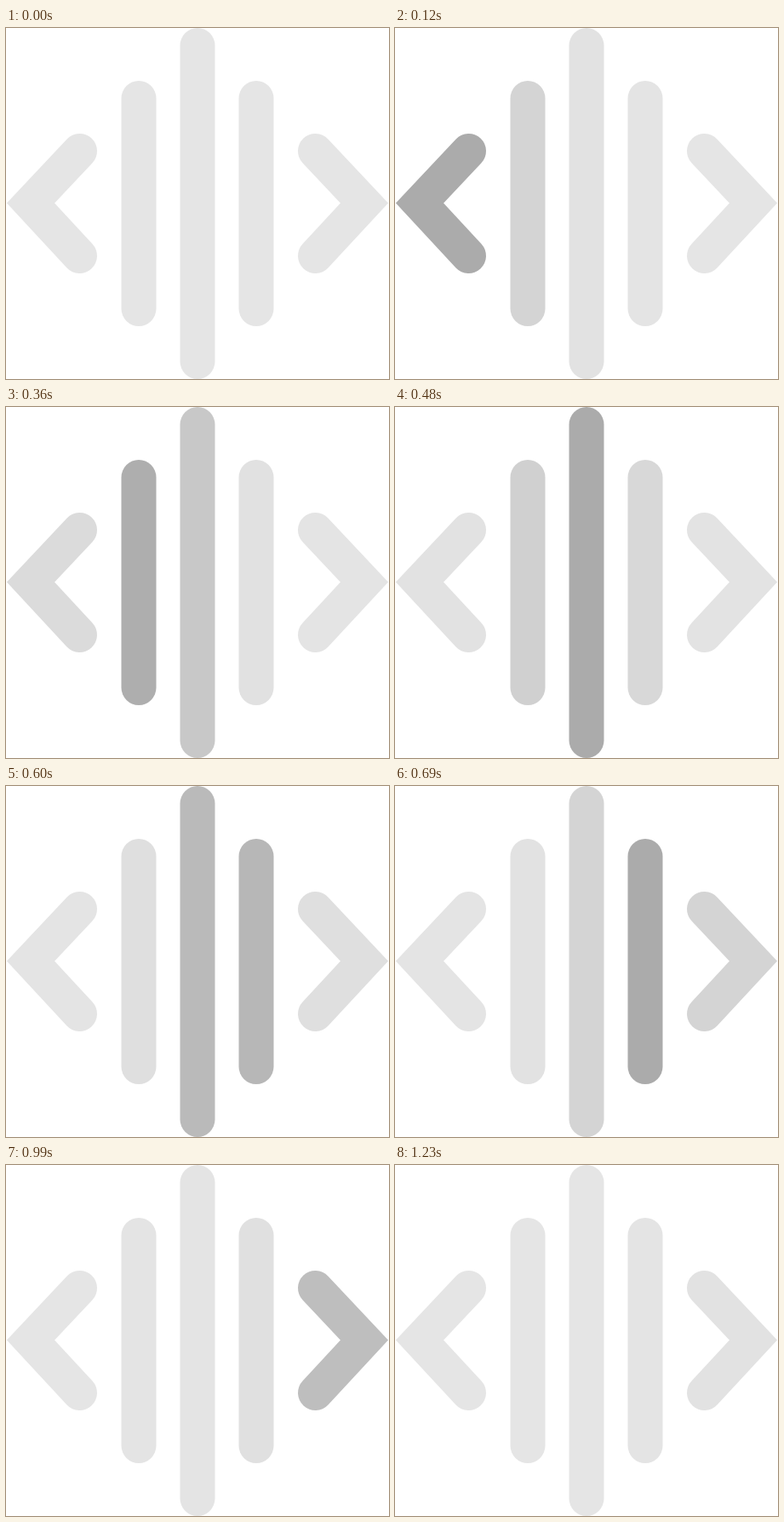
These frames come from a looping animation (450x412 px, 1380 ms). An HTML page:

```html
<!DOCTYPE html>
<html lang="en">
<head>
<meta charset="utf-8">
<title>Pulsing bars</title>
<style>
  html, body { margin: 0; width: 100%; height: 100%; overflow: hidden; background: #fff; }
  svg { display: block; width: 450px; height: 412px; }
  path { fill: none; stroke-width: 41; stroke-linecap: round; stroke-linejoin: miter; }
</style>
</head>
<body>
<svg viewBox="0 0 450 412">
  <path d="M86.5 144.5 L29 205.5 L86.5 267.5"/>
  <path d="M156 82.5 V329.5"/>
  <path d="M225 20.5 V391.5"/>
  <path d="M294 82.5 V329.5"/>
  <path d="M363.5 144.5 L421 205.5 L363.5 267.5"/>
</svg>
<script>
  const LOOP = 1380, STEP = 30, LAST_STEP = 1230;
  const FIRST_PEAK = 120, STAGGER = 190, WIDTH = 140;
  const REST_GREY = 229, DEPTH = 58;
  const parts = document.querySelectorAll('path');

  // Flat-topped bell: 1 at the peak, 0.5 at WIDTH, then a long tail.
  const pulse = distance => 1 / (1 + Math.abs(distance / WIDTH) ** 3);

  function draw() {
    const t = Math.min(Math.floor(performance.now() % LOOP / STEP) * STEP, LAST_STEP);
    const rampIn = Math.min(1, t / FIRST_PEAK);
    parts.forEach((part, i) => {
      const strength = rampIn * pulse(t - FIRST_PEAK - i * STAGGER);
      const grey = Math.round(REST_GREY - DEPTH * strength);
      part.style.stroke = `rgb(${grey}, ${grey}, ${grey})`;
    });
    requestAnimationFrame(draw);
  }
  draw();
</script>
</body>
</html>
```
